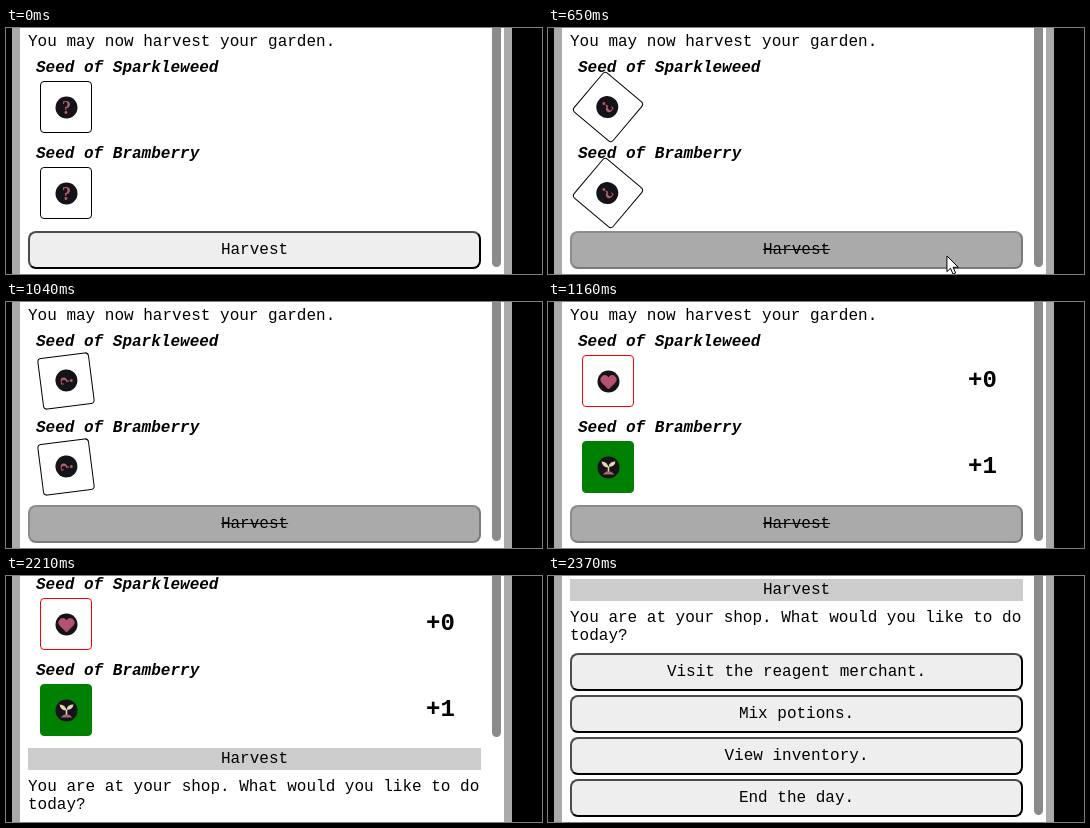
Recreate the animation shown at these times as an HTML page. Size 536 by 246 pixels, loop 3.06 s.

```html
<!DOCTYPE html>
<html lang="en">
<head>
<meta charset="utf-8">
<title>Harvest</title>
<style>
html, body { margin: 0; width: 100%; height: 100%; overflow: hidden; background: #000; }
#stage { position: relative; width: 536px; height: 246px; overflow: hidden; background: #000;
  font: 16px/18px "Liberation Mono", "Courier New", monospace; color: #000; }
#stage div, #stage svg { position: absolute; box-sizing: border-box; white-space: pre; }
#panel { left: 6px; width: 500px; top: 0; height: 246px; background: #fff;
  border: solid #aaa; border-width: 0 8px; }
#page, #beds, #shop { left: 0; top: 0; width: 486px; height: 460px; }
.title { left: 30px; font-weight: bold; font-style: italic; }
.card { left: 34px; width: 52px; height: 52px; border: 1px solid #000; border-radius: 4px; background: #fff; }
.card svg { left: 14px; top: 14px; width: 23px; height: 23px; }
.gain { left: 420px; font: bold 24px/28px "Liberation Mono", "Courier New", monospace; }
.button { left: 22px; width: 453px; height: 38px; line-height: 34px; text-align: center;
  background: #eee; border: 2px solid; border-color: #4c4c4c #000 #000 #4c4c4c; border-radius: 8px; }
.off { background: #aaa; border-color: #8c8c8c #7a7a7a #7a7a7a #8c8c8c; text-decoration: line-through; }
.done { height: 22px; line-height: 22px; background: #ccc; border: 0; border-radius: 0; }
#thumb { left: 486px; width: 9px; height: 300px; background: #8b8b8b; border-radius: 4.5px; }
#press { left: 384px; top: 213px; width: 24px; height: 24px; border-radius: 50%; background: rgba(255,255,0,.5); }
#cursor { left: 0; top: 0; width: 14px; height: 21px; overflow: visible; }
</style>
</head>
<body>
<div id="stage">
  <div id="panel"></div>
  <div id="page">
    <div style="left:22px;top:5px">You may now harvest your garden.</div>
    <div id="beds"></div>
    <div id="shop"><div style="left:22px;top:233px">You are at your shop. What would you like to do
today?</div></div>
    <div id="harvest" class="button" style="top:203px">Harvest</div>
  </div>
  <div id="thumb"></div>
  <div id="press"></div>
  <svg id="cursor"><path d="M.5 .5V16.2L4.1 12.8L6.6 18.6L9.2 17.5L6.7 11.8H11.8Z" fill="#fff" stroke="#000"/></svg>
</div>
<script>
const LOOP = 3060, CLICK = 548, SPIN_END = 1118, REVEAL = 1140, SHOP = 2130, SCROLL = 240;
const $ = id => document.getElementById(id);
const clamp = v => Math.max(0, Math.min(1, v));
const show = (el, on) => el.style.display = on ? '' : 'none';
const easeInOut = u => u < .5 ? 4 * u ** 3 : 1 - 4 * (1 - u) ** 3;

const icon = art => `<svg viewBox="-11.5 -11.5 23 23"><circle r="11" fill="#151219"/>${art}</svg>`;
const mystery = icon('<text y="6" text-anchor="middle" font-family="Liberation Serif,serif" font-weight="bold" font-size="18" fill="#ad626a">?</text>');
const heart = icon('<path d="M0 7.5L-6.5 1C-9-2-7-6-4-6C-2-6-.6-5 0-3.5C.6-5 2-6 4-6C7-6 9-2 6.5 1Z" fill="#b5526f" stroke="#b5526f"/>');
const sprout = icon('<path d="M-6 7Q0 0 6 7Z" fill="#a5687c"/><path d="M0 4V-1" stroke="#e6d6b0" stroke-width="1.6"/>' +
  '<path d="M0 0Q-6 0-7-6Q-1-6 0 0ZM0-1Q1-6 7-6Q6 0 0-1Z" fill="#e6d6b0"/>');

const beds = [
  { name: 'Sparkleweed', top: 31, gain: '+0', art: heart, edge: 'red', fill: '#fff' },
  { name: 'Bramberry', top: 117, gain: '+1', art: sprout, edge: 'green', fill: 'green' }
];
$('beds').innerHTML = beds.map(b => `<div class="title" style="top:${b.top}px">Seed of ${b.name}</div>
<div class="card" style="top:${b.top + 22}px"></div>
<div class="gain" style="top:${b.top + 34}px">${b.gain}</div>`).join('');
const cards = document.querySelectorAll('.card'), gains = document.querySelectorAll('.gain');

$('shop').innerHTML += ['Visit the reagent merchant.', 'Mix potions.', 'View inventory.', 'End the day.']
  .map((label, i) => `<div class="button" style="top:${277 + 42 * i}px">${label}</div>`).join('');

let wasRevealed;
function drawBeds(t) {
  const revealed = t >= REVEAL;
  const angle = 720 * clamp((t - CLICK) / (SPIN_END - CLICK));
  beds.forEach((b, i) => {
    const card = cards[i];
    card.style.transform = angle % 360 ? `rotate(${angle}deg)` : 'none';
    if (revealed === wasRevealed) return;
    card.innerHTML = revealed ? b.art : mystery;
    card.style.borderColor = revealed ? b.edge : '#000';
    card.style.background = revealed ? b.fill : '#fff';
    show(gains[i], revealed);
  });
  wasRevealed = revealed;
}

function drawCursor(t) {
  const enter = 1 - (1 - clamp((t - 150) / 80)) ** 2;
  const leave = clamp((t - 600) / 160) ** 2;
  const x = 443 - 46 * enter + 14 * leave, y = 241 - 16 * enter + 24 * leave;
  show($('cursor'), t >= 150 && t < 760);
  $('cursor').style.transform = `translate(${x}px,${y}px)`;
  show($('press'), t >= 490 && t < CLICK);
}

function draw(t) {
  const atShop = t >= SHOP;
  const scroll = Math.round(200 * easeInOut(clamp((t - SHOP) / SCROLL)));
  drawBeds(t);
  drawCursor(t);
  $('harvest').className = 'button' + (atShop ? ' done' : t >= CLICK ? ' off' : '');
  show($('shop'), atShop);
  $('page').style.top = -scroll + 'px';
  $('thumb').style.top = (atShop ? 147 + .46 * scroll : 239) - 300 + 'px';
}

const start = performance.now();
function tick() {
  draw((performance.now() - start) % LOOP);
  requestAnimationFrame(tick);
}
tick();
</script>
</body>
</html>
```
